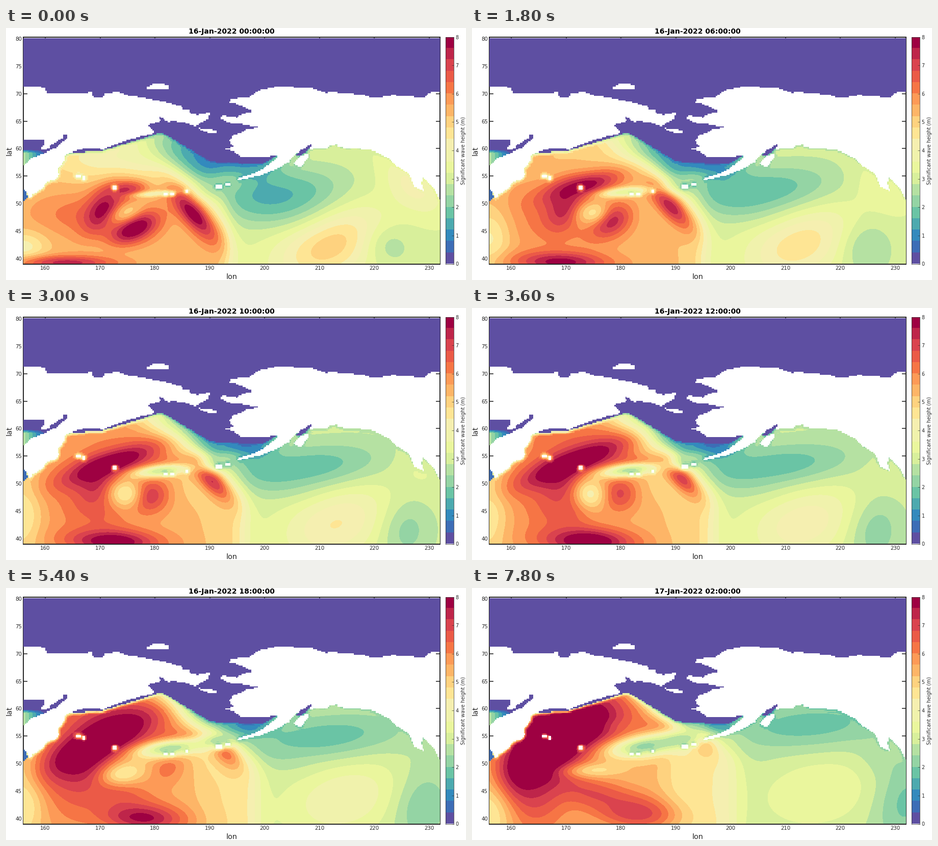
A matplotlib script that plays this animation: 902x494 px, repeating every 8000 ms.

```python
import numpy as np
import matplotlib.pyplot as plt
from matplotlib.animation import FuncAnimation
from matplotlib.path import Path

W, H, DPI = 902, 494, 64
LEFT, TOP = 34, 21            # pixel corner of the map
COLS, ROWS = 817, 441         # map size in pixels
NX, NY = 304, 164             # quarter-degree cells
LAST = 26                     # hours covered
HOLD = 3                      # ticks of 200 ms per two-hour step
INK = "#262626"

PALETTE = ["#5e4fa2", "#3d6db6", "#338abd", "#4caaaf", "#6ac4a5",
           "#94d4a4", "#b5e1a2", "#d8ef9b", "#eaf69d", "#f0f2ac",
           "#f5efb0", "#fee594", "#fed27f", "#fdb567", "#fd9a57",
           "#f67545", "#eb5a47", "#da434e", "#be254a", "#9e0142"]
RGB = np.array([[int(c[i:i + 2], 16) for i in (1, 3, 5)] for c in PALETTE])

x = LEFT + np.arange(COLS) + 0.5
y = TOP + np.arange(ROWS) + 0.5
X, Y = np.meshgrid(x, y)

# Coarse cells give the stepped coast
cx, cy = np.meshgrid(LEFT + (np.arange(NX) + 0.5) * COLS / NX,
                     TOP + (np.arange(NY) + 0.5) * ROWS / NY)
centres = np.column_stack([cx.ravel(), cy.ravel()])


def inside(*corners):
    return Path(corners).contains_points(centres).reshape(NY, NX)


def blur(mask, passes=2):
    m = mask.astype(float)
    for _ in range(passes):
        p = np.pad(m, 1, mode="edge")
        m = sum(p[i:i + NY, j:j + NX] for i in range(3) for j in range(3)) / 9
    return m


def to_pixels(cells):
    rows = np.arange(ROWS) * NY // ROWS
    cols = np.arange(COLS) * NX // COLS
    return cells[np.ix_(rows, cols)]


# Coasts and ice, in stage pixels
siberia = inside(
    (34, 114), (68, 114), (70, 117), (77, 118), (80, 129), (105, 129),
    (168, 127), (169, 135), (190, 138), (193, 129), (218, 126), (240, 133),
    (268, 137), (318, 147), (345, 155), (347, 161), (358, 162), (358, 166),
    (374, 171), (399, 166), (400, 171), (395, 174), (397, 178), (370, 193),
    (350, 186), (330, 183), (316, 184), (299, 173), (303, 183), (278, 190),
    (290, 203), (287, 208), (256, 215), (34, 215))
kamchatka = inside(
    (34, 205), (256, 210), (256, 215), (222, 226), (205, 232), (186, 240),
    (183, 236), (150, 237), (118, 247), (113, 252), (116, 258), (101, 275),
    (103, 287), (98, 296), (82, 300), (67, 317), (52, 325), (46, 333),
    (41, 322), (34, 316))
okhotsk = inside(
    (34, 219), (47, 219), (74, 220), (75, 227), (70, 233), (70, 239),
    (82, 237), (90, 228), (112, 216), (113, 210), (119, 209), (119, 217),
    (97, 235), (70, 247), (50, 255), (43, 262), (34, 268))
strait = inside((34, 317), (38, 319), (42, 332), (36, 338), (34, 339))
alaska_north = inside(
    (851, 125), (836, 126), (826, 130), (820, 137), (785, 134), (757, 132),
    (722, 138), (697, 131), (652, 128), (642, 125), (628, 128), (595, 117),
    (565, 118), (560, 114), (540, 114), (497, 122), (475, 136), (441, 139),
    (438, 147), (452, 149), (484, 164), (462, 169), (452, 176), (424, 172),
    (421, 178), (440, 187), (462, 187), (466, 191), (494, 193), (494, 196),
    (470, 199), (466, 204), (446, 210), (441, 215), (851, 215))
alaska_south = inside(
    (851, 210), (446, 210), (438, 222), (445, 234), (429, 236), (430, 239),
    (445, 241), (460, 251), (490, 253), (531, 250), (531, 254), (505, 274),
    (490, 283), (453, 295), (455, 298), (497, 289), (530, 276), (553, 263),
    (566, 248), (597, 228), (598, 232), (594, 241), (605, 236), (630, 236),
    (636, 230), (648, 229), (650, 234), (715, 239), (752, 256), (758, 264),
    (790, 286), (800, 310), (820, 321), (814, 303), (816, 293), (823, 297),
    (840, 315), (851, 340))
wrangel = inside((277, 115), (277, 121), (319, 121), (319, 113), (305, 110),
                 (290, 110))
lawrence = inside((378, 197), (388, 205), (413, 206), (413, 203), (400, 198))
kodiak = inside((562, 266), (578, 272), (592, 254), (592, 246), (575, 252))
ice = inside(
    (34, 21), (851, 21), (851, 200), (540, 235), (531, 250), (500, 267),
    (400, 261), (380, 249), (345, 229), (312, 209), (302, 205), (262, 219),
    (186, 241), (120, 245), (34, 236))
ice |= inside((568, 250), (580, 238), (597, 227), (599, 233), (580, 248))

land = (siberia | kamchatka | alaska_north | alaska_south
        | wrangel | lawrence | kodiak) & ~(okhotsk | strait)
for ix, iy, half in [(142, 290, 5), (152, 294, 2), (214, 313, 4),
                     (313, 325, 4), (326, 324, 4), (353, 319, 3),
                     (416, 310, 7), (434, 306, 6)]:
    land |= (abs(cx - ix) < half) & (abs(cy - iy) < 3)

# Waves die out within a few cells of land and ice
shelter = 1 - np.where(cx < 470, 0.75, 0.25) * blur(land)
shelter = to_pixels(shelter * (1 - 0.9 * blur(ice)))
bay = np.clip((Y - 239) / 6, 0, 1) * np.clip(2.6 - 0.055 * (X - LEFT), 0, 3)
land, ice, okhotsk, strait = map(to_pixels, (land, ice, okhotsk, strait))


class Swell:
    """Soft ellipse (x, y, rx, ry, height) drifting through three poses."""

    def __init__(self, first, middle, last, spin=(0, 0)):
        self.poses = list(zip(first, middle, last))
        self.spin = spin

    def paint(self, sea, hour):
        px0, py0, rx, ry, height = (np.interp(hour, (0, LAST * 0.46, LAST), p)
                                    for p in self.poses)
        a = np.radians(np.interp(hour, (0, LAST), self.spin))
        dx, dy = X - px0, Y - py0
        u = (dx * np.cos(a) + dy * np.sin(a)) / rx
        v = (dy * np.cos(a) - dx * np.sin(a)) / ry
        sea += (height - sea) * np.exp(-u * u - v * v)


SWELLS = [
    # Gulf of Alaska and the eastern ocean
    Swell((635, 425, 110, 65, 5.1), (650, 422, 110, 70, 4.3),
          (680, 400, 125, 75, 3.6), (-25, -10)),
    Swell((795, 310, 70, 40, 4.2), (800, 320, 60, 40, 3.2),
          (810, 330, 60, 40, 2.6), (40, 40)),
    Swell((760, 430, 48, 45, 2.7), (795, 440, 50, 70, 2.2),
          (852, 420, 55, 85, 1.9), (10, 15)),
    Swell((545, 328, 125, 50, 1.7), (598, 308, 160, 42, 1.75),
          (660, 268, 170, 45, 1.8), (-10, -4)),
    # western margin and the broad swell round the storm
    Swell((140, 365, 80, 40, 6.2), (135, 365, 65, 100, 6.0),
          (125, 400, 65, 85, 6.7)),
    Swell((34, 430, 45, 30, 4.2), (34, 400, 32, 90, 4.5),
          (34, 410, 42, 90, 3.9)),
    Swell((210, 430, 50, 20, 5.0), (185, 400, 55, 38, 6.5),
          (240, 405, 120, 32, 6.8), (0, 14)),
    # Bering Sea: open water, then the lee of the ice
    Swell((220, 255, 150, 45, 4.1), (195, 258, 110, 45, 6.2),
          (195, 262, 110, 45, 7.4)),
    Swell((300, 300, 50, 15, 4.5), (322, 300, 75, 15, 6.2),
          (320, 270, 80, 16, 6.0), (5, 0)),
    Swell((395, 262, 150, 52, 1.1), (400, 256, 130, 38, 1.5),
          (405, 250, 110, 19, 2.2), (28, 28)),
    Swell((455, 275, 70, 28, 0.9), (470, 272, 52, 22, 0.7),
          (480, 272, 45, 15, 1.2)),
    # southern core, spiral arm, inner and eastern cores, eye
    Swell((120, 460, 90, 14, 7.4), (228, 457, 88, 27, 8.3),
          (318, 440, 70, 28, 7.1), (0, 5)),
    Swell((190, 356, 50, 30, 7.9), (170, 348, 52, 40, 7.0),
          (120, 375, 45, 45, 7.0), (-55, -100)),
    Swell((252, 393, 55, 28, 8.2), (289, 364, 36, 36, 6.9),
          (350, 338, 40, 22, 5.3), (-25, -40)),
    Swell((367, 364, 70, 25, 8.0), (410, 333, 52, 22, 7.1),
          (455, 310, 32, 25, 5.2), (50, 42)),
    Swell((240, 358, 35, 16, 5.1), (232, 364, 27, 30, 4.3),
          (228, 356, 60, 14, 4.3), (-30, 0)),
    Swell((232, 318, 45, 18, 7.3), (200, 303, 110, 28, 8.6),
          (160, 302, 128, 58, 9.4), (-10, -34)),
    # lee of the island chain
    Swell((290, 325, 40, 6, 4.0), (308, 318, 55, 12, 2.6),
          (340, 310, 70, 20, 2.2), (-5, -8)),
    Swell((430, 305, 50, 25, 2.4), (425, 298, 35, 16, 2.5),
          (405, 298, 45, 14, 2.4), (-10, -10)),
]


def sigmoid(z):
    return 1 / (1 + np.exp(-z))


def wave_height(hour):
    t = hour / LAST
    west = 5.4 - 0.9 * t * sigmoid((X - 380) / 15)
    east = 3.1 - 0.35 * t
    front = 435 + 83 * t
    sea = east + (west - east) * sigmoid((front - X) / (10 + 4 * t))
    for swell in SWELLS:
        swell.paint(sea, hour)
    sea *= shelter
    sea[ice] = 0
    return np.where(okhotsk, bay, np.where(strait, 0.6, sea))


def picture(hour):
    band = np.clip(wave_height(hour) / 0.4, 0, 19).astype(int)
    rgba = np.empty((ROWS, COLS, 4), np.uint8)
    rgba[..., :3] = RGB[band]
    rgba[..., 3] = np.where(land, 0, 255)
    return rgba


PICTURES = [picture(h) for h in range(0, LAST + 1, 2)]


def px(n):
    return n * 72 / DPI


def box(x0, y0, x1, y1):
    return fig.add_axes([x0 / W, 1 - y1 / H, (x1 - x0) / W, (y1 - y0) / H])


def label(lx, ly, text, size, **kw):
    return fig.text(lx / W, 1 - ly / H, text, fontsize=px(size), ha="center",
                    va="center", color=INK, **kw)


plt.rcParams["font.family"] = "DejaVu Sans"
fig = plt.figure(figsize=(W / DPI, H / DPI), dpi=DPI, facecolor="white")

ax = box(34, 18.5, 851, 462.5)
image = ax.imshow(PICTURES[0], extent=(156, 232, 39, 80), aspect="auto",
                  interpolation="nearest", zorder=1)
ax.set(xlim=(156, 232), ylim=(39, 80.245),
       xticks=range(160, 231, 10), yticks=range(40, 81, 5))
ax.set_axisbelow(True)
ax.tick_params(direction="in", top=True, right=True, length=px(8),
               width=px(1.6), color=INK, labelcolor=INK, labelsize=px(10.2))
ax.tick_params(axis="x", pad=px(4))
ax.tick_params(axis="y", pad=px(3))
for spine in ax.spines.values():
    spine.set(linewidth=px(2), color=INK, zorder=0.8)

bar = box(861.5, 17.5, 877.5, 462.5)
bar.imshow(RGB[::-1, None].astype(np.uint8), extent=(0, 1, 0, 8),
           aspect="auto", interpolation="nearest")
bar.set(xticks=[], yticks=range(9))
bar.yaxis.tick_right()
bar.tick_params(direction="in", length=px(4), width=px(0.6), color=INK,
                labelcolor=INK, labelsize=px(9.5), pad=px(4))
for spine in bar.spines.values():
    spine.set(linewidth=px(0.7), color=INK)

label(442.5, 488.5, "lon", 14.4)
label(6.5, 240.5, "lat", 14.4, rotation=90)
label(897, 240, "Significant wave height (m)", 9.6, rotation=90)
title = fig.text(442.5 / W, 1 - 11 / H, "", fontsize=px(14), weight="bold",
                 ha="center", va="baseline", color="black")


def draw(i):
    step = i // HOLD
    day, hour = divmod(2 * step, 24)
    image.set_data(PICTURES[step])
    title.set_text(f"{16 + day}-Jan-2022 {hour:02d}:00:00")
    return image, title


anim = FuncAnimation(fig, draw, frames=40, interval=200, repeat=True,
                     repeat_delay=0, blit=False)
plt.show()
```
